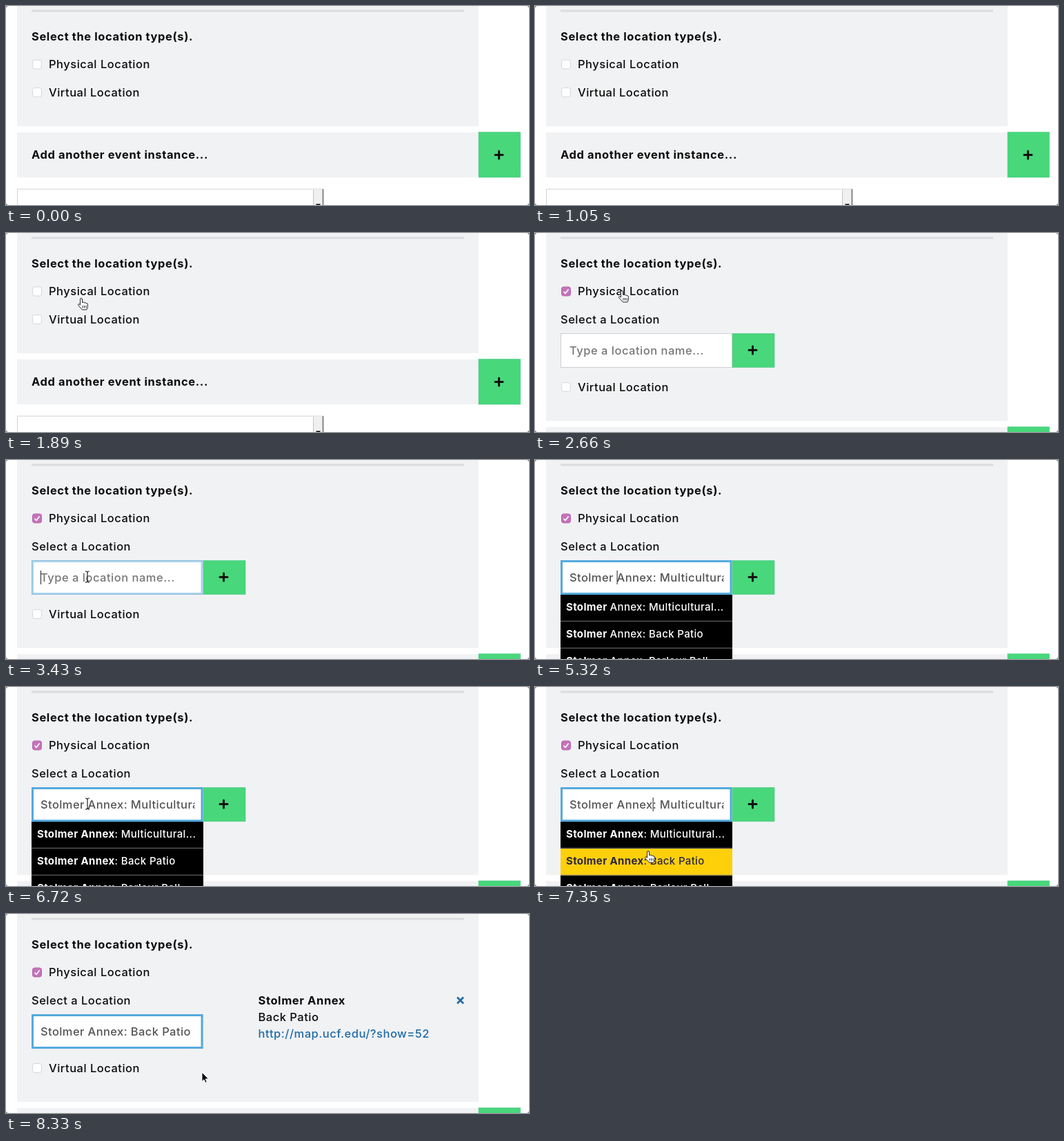
An HTML page that plays this animation: 758x288 px, repeating every 8.4 s.

```html
<!DOCTYPE html>
<html lang="en">
<head>
<meta charset="utf-8">
<title>Location picker</title>
<style>
  html, body { margin: 0; width: 100%; height: 100%; overflow: hidden; background: #fff; }
  svg { display: block; width: 758px; height: 288px; }
  text { font: 500 16.5px Inter, "Open Sans", sans-serif; letter-spacing: .5px; white-space: pre; fill: #0c0c0c; }
  .b { font-weight: 700; letter-spacing: .6px; }
  .panel { fill: #f1f2f4; }
  .green { fill: #48d77a; stroke: #3fc184; stroke-opacity: .5; }
  .plus { stroke: #111; stroke-width: 3; stroke-linecap: round; }
  .box { fill: #fff; stroke: #d3d6db; }
  .link { fill: #1f6aa8; }
  .field { fill: #555; letter-spacing: .4px; }
  .hold { fill: #777; }
  .row text { font-size: 15px; fill: #fff; letter-spacing: .35px; }
  .row .b { letter-spacing: inherit; }
  .row.hot rect { fill: #fdd00a; }
  .row.hot text { fill: #2b2440; }
</style>
</head>
<body>
<svg viewBox="0 0 758 288">
  <defs>
    <clipPath id="clip"><rect x="48" y="150" width="225.5" height="40"/></clipPath>
    <path id="plus" class="plus" d="M-5.5 0H5.5M0-5.5V5.5"/>
  </defs>

  <rect id="panel" class="panel" x="16" width="669" height="174"/>
  <rect x="37" y="5.5" width="627" height="3" fill="#dbdce0"/>
  <text class="b" x="37" y="50">Select the location type(s).</text>
  <rect id="check" class="box" x="38.5" y="78" width="13" height="13" rx="3"/>
  <path id="tick" d="M41.5 84.7L44 87.5L48.6 81.5" fill="none" stroke="#fff" stroke-width="1.7"/>
  <text x="62" y="90">Physical Location</text>

  <g id="below">
    <rect class="box" x="38.5" y="118.5" width="13" height="13" rx="3"/>
    <text x="62" y="131">Virtual Location</text>
    <rect class="panel" x="16" y="183" width="669" height="65"/>
    <text class="b" x="37" y="221">Add another event instance...</text>
    <rect class="green" x="685" y="182.5" width="60.5" height="65.5"/>
    <use href="#plus" x="714.5" y="215.5"/>
    <rect x="16.5" y="265" width="443" height="40" fill="#fff" stroke="#d3d3d3"/>
    <rect x="446" y="266" width="13" height="40" fill="#f0f0f2"/>
    <path d="M445.5 266V300" stroke="#c4c4c8"/>
    <path d="M459.5 265V300" stroke="#85858a" stroke-width="2"/>
    <path d="M449 286.5H456L452.5 291Z"/>
  </g>

  <g id="picker">
    <text x="37" y="130.5">Select a Location</text>
    <g id="add">
      <rect class="green" x="285" y="145.5" width="62" height="49"/>
      <use href="#plus" x="315.5" y="169.5"/>
    </g>
    <rect x="37.5" y="145.5" width="248" height="49" fill="#fff" stroke="#cccfd3"/>
    <rect id="ring" x="38.5" y="146.5" width="245.5" height="47" fill="none" stroke="#55aadd" stroke-width="3"/>
    <g clip-path="url(#clip)">
      <text id="hold" class="hold" x="50" y="175.5">Type a location name...</text>
      <text class="field" x="50" y="175.5"><tspan id="typed"></tspan><tspan id="hint"></tspan></text>
    </g>
    <rect id="caret" y="160" width="1" height="20" fill="#222"/>
    <g id="list"></g>
  </g>

  <g id="details">
    <text class="b" x="365.5" y="130.5">Stolmer Annex</text>
    <text x="365.5" y="154.5">Back Patio</text>
    <text class="link" x="365.5" y="178.5">http://map.ucf.edu/?show=52</text>
    <path d="M654 120.5L663 129.5M663 120.5L654 129.5" stroke="#1f6aa8" stroke-width="2.6"/>
  </g>

  <g id="cursor" stroke-linejoin="round">
    <path id="arrow" d="M0 0V13.5L3 10.7L5 15.3L7.2 14.3L5.2 9.8H9.5Z" fill="#000" stroke="#fff"/>
    <path id="hand" d="M-1.5 1.5a1.5 1.5 0 0 1 3 0V6q2-1 3 .5q2-.8 2.6.7q2-.4 2.3 1.5V12q0 2-1.6 4.5H1.5L-4.2 10.3q-1-2 1-2.2L-1.5 9.6ZM2 10.5V14M4.5 10.5V14M7 10.5V14" fill="#fff" stroke="#222"/>
    <path id="beam" d="M-3-8Q0-8 0-6Q0-8 3-8M0-6V6M-3 8Q0 8 0 6Q0 8 3 8" fill="none" stroke="#222" stroke-width="1.2"/>
  </g>

  <path d="M0 0H4Q0 0 0 4ZM758 0V4Q758 0 754 0ZM0 288V284Q0 288 4 288ZM758 288H754Q758 288 758 284Z" fill="#777"/>
</svg>

<script>
const LOOP = 8400, STEP = 70;
const OPEN = 2520, FOCUS = 3430, TYPE = 4130, LIST = 4760, RETURN = 6720, PICK = 7560;
const PLACE = 'Stolmer Annex';
const ROOMS = ['Multicultural...', 'Back Patio', 'Parlour Ball...'];
const KEYS = [4130, 4480, 4620, 4760, 4900, 5110, 5250, 5320, 5460, 5600, 5740, 5810, 5950];
// time, x, y of the pointer's hot spot
const PATH = [
  [1400, 250, 190], [1890, 109, 94.5], [2240, 126, 83.5], [2800, 126, 83.5], [3360, 118, 169],
  [6790, 118, 169], [7350, 164, 237.5], [7560, 164, 240], [8190, 284, 229]
];

const $ = id => document.getElementById(id);
const show = (id, on) => $(id).style.display = on ? '' : 'none';
const within = (t, a, b) => t >= a && t < b;

$('list').innerHTML = ROOMS.map((_, i) => `<g class="row" transform="translate(37 ${195 + 39 * i})">
  <rect width="249" height="39"/><path d="M0 38.2H249" stroke="#777"/>
  <text x="8" y="23"><tspan class="b"></tspan><tspan></tspan></text></g>`).join('');
const rows = [...document.querySelectorAll('.row')];

function pointer(t) {
  const i = PATH.findIndex(p => p[0] > t);
  if (i < 0) return PATH.at(-1).slice(1);
  if (i === 0) return PATH[0].slice(1);
  const [t0, x0, y0] = PATH[i - 1], [t1, x1, y1] = PATH[i];
  const u = (t - t0) / (t1 - t0), e = u * u * (3 - 2 * u);
  return [x0 + (x1 - x0) * e, y0 + (y1 - y0) * e];
}

function drawCursor(t, x, y) {
  const kind = t >= PICK || (t < OPEN && y > 110) ? 'arrow'
    : t >= OPEN && within(y, 145, 195) ? 'beam' : 'hand';
  for (const k of ['arrow', 'hand', 'beam']) show(k, k === kind);
  show('cursor', within(t, 1400, TYPE) || t >= RETURN);
  $('cursor').setAttribute('transform', `translate(${x} ${y})`);
}

// Returns how many letters have been typed.
function drawField(t) {
  const picked = t >= PICK;
  const count = KEYS.filter(k => k <= t).length;
  const full = `${PLACE}: ${picked ? ROOMS[1] : 'Multicultural Center'}`;
  $('typed').textContent = picked ? full : PLACE.slice(0, count);
  $('hint').textContent = within(t, LIST, PICK) ? full.slice(count) : '';
  show('hold', t < TYPE);
  $('ring').style.opacity = Math.min(1, Math.max(0, (t - FOCUS + STEP) / 140));
  const blink = within(t, FOCUS, 3850) || within(t, 4620, 6160) || within(t, 6930, PICK);
  show('caret', blink);
  if (blink) $('caret').setAttribute('x', 50 + (count ? $('typed').getComputedTextLength() : 0));
  return count;
}

function drawList(t, y, count) {
  show('list', within(t, LIST, PICK));
  const hot = t >= RETURN ? Math.floor((y - 195) / 39) : -1;
  rows.forEach((row, i) => {
    const [match, rest] = row.querySelectorAll('tspan');
    match.textContent = PLACE.slice(0, count);
    rest.textContent = `${PLACE}: ${ROOMS[i]}`.slice(count);
    row.classList.toggle('hot', i === hot);
  });
}

function draw(t) {
  const open = t >= OPEN, [x, y] = pointer(t);
  $('panel').setAttribute('height', open ? 272 : 174);
  $('below').setAttribute('transform', `translate(0 ${open ? 98 : 0})`);
  $('check').style.cssText = open ? 'fill:#c572ba;stroke:#b765ac' : '';
  show('tick', open);
  show('picker', open);
  show('add', t < PICK);
  show('details', t >= PICK);
  drawList(t, y, drawField(t));
  drawCursor(t, x, y);
}

const start = performance.now();
function frame() {
  const t = (performance.now() - start) % LOOP;
  draw(Math.floor(t / STEP) * STEP);
  requestAnimationFrame(frame);
}
frame();
</script>
</body>
</html>
```
